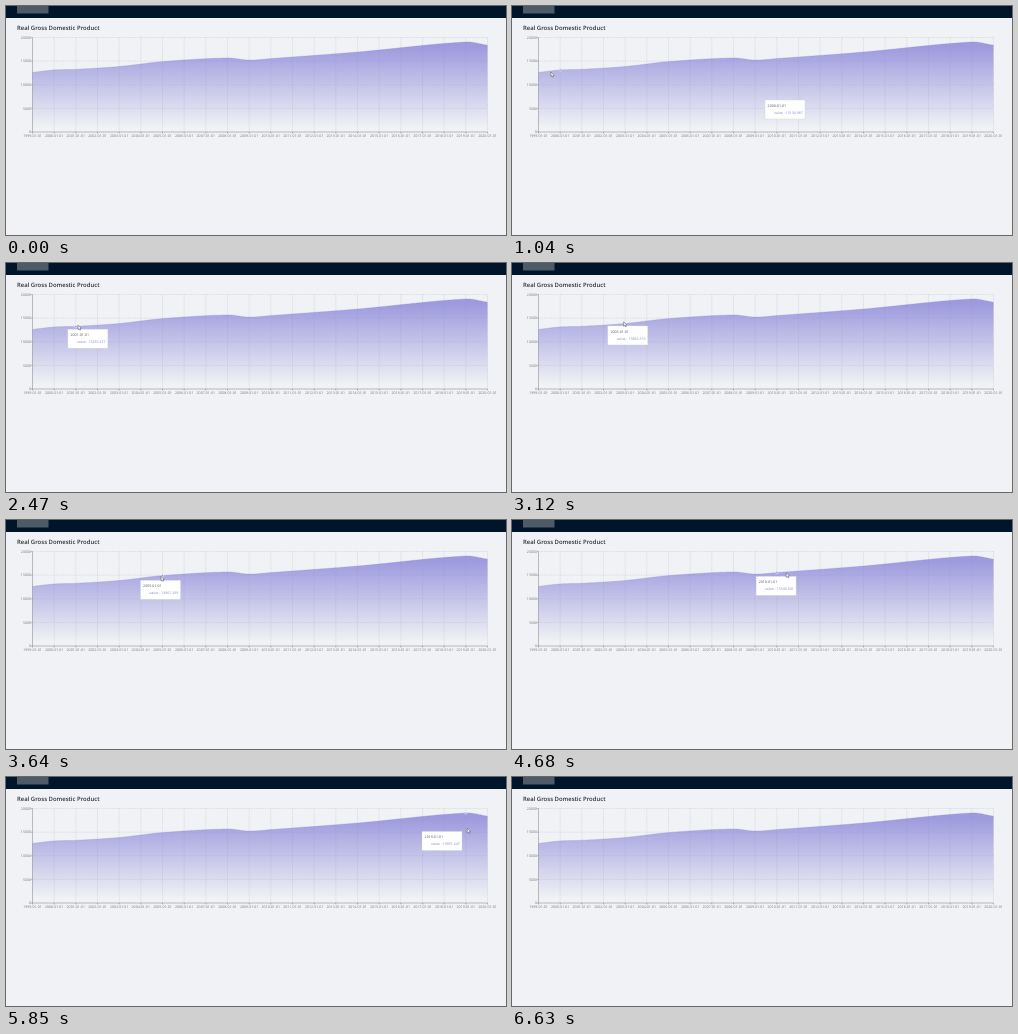
An HTML page with a canvas for the animation above (8.32 s loop, 500 by 229 pixels).

```html
<!DOCTYPE html>
<html lang="en">
<head>
<meta charset="utf-8">
<title>Real Gross Domestic Product</title>
<style>
  html, body { margin: 0; width: 100%; height: 100%; overflow: hidden; background: #f0f2f5; }
  canvas { display: block; }
</style>
</head>
<body>
<canvas id="stage" width="500" height="229"></canvas>
<script>
const ctx = document.getElementById('stage').getContext('2d');
const LOOP = 8320, STEP = 130;
const LEFT = 26.5, RIGHT = 481.5, TOP = 31.5, BOTTOM = 126;
const FIRST = 1999, LAST = 2020;
const ENTER = 780, HOVER = 1040, LEAVE = 5950, GONE = 6500;
const LAG = 230, SETTLE = 390;
const FONT = '"Open Sans", "Noto Sans", sans-serif';
const GRID = '#c3c5c9', AXIS = '#777', LILAC = '#8884d8';
const ARROW = new Path2D('M0 0V4.5L1 3.6 1.8 5.2 2.6 4.8 1.9 3.3H3.2Z');

// Turning points of the series; the years between are interpolated
const keys = [
  [1999, 12611.214], [2000, 13130.987], [2001, 13263.417], [2003, 13865.519],
  [2005, 14901.269], [2008, 15666.738], [2009, 15219.277], [2010, 15540.501],
  [2014, 16932.051], [2019, 19051.247], [2020, 18370.409]
];

const clamp = (v, lo, hi) => Math.max(lo, Math.min(hi, v));
const xOf = year => LEFT + (year - FIRST) / (LAST - FIRST) * (RIGHT - LEFT);
const yearOf = x => FIRST + (x - LEFT) / (RIGHT - LEFT) * (LAST - FIRST);
const yOf = value => BOTTOM - value / 20000 * (BOTTOM - TOP);

function slope(i) {
  const a = keys[Math.max(0, i - 1)], b = keys[Math.min(keys.length - 1, i + 1)];
  return (b[1] - a[1]) / (b[0] - a[0]);
}

function gdp(year) {
  const i = clamp(keys.findIndex(k => k[0] >= year), 1, keys.length - 1);
  const [x0, y0] = keys[i - 1], [x1, y1] = keys[i];
  const w = x1 - x0, u = (year - x0) / w, v = 1 - u;
  return y0 * v * v * (1 + 2 * u) + y1 * u * u * (3 - 2 * u)
    + w * u * v * (slope(i - 1) * v - slope(i) * u);
}

// Accelerating sweep along the curve
function sweep(t) {
  const x = 39 + 15.6 * Math.max(0, (t - HOVER) / 1000) ** 2.1;
  return { x, y: 51 + 15 * Math.exp((39 - x) / 110) };
}

function pointerAt(t) {
  const { x, y } = sweep(t);
  const before = Math.max(0, (HOVER - t) / (HOVER - ENTER));
  const after = Math.max(0, (t - LEAVE) / (GONE - LEAVE));
  return { x: Math.min(494, x + 290 * before), y: y + 124 * before + 130 * after };
}

function tooltipAt(t) {
  const { x, y } = sweep(t - LAG);
  const k = Math.max(0, 1 - (t - HOVER) / SETTLE) ** 2;
  return { x: clamp(x, 51, 416) + 202 * k, y: y + 3 + 25 * k };
}

function text(s, x, y, color, align = 'left', size = 3.55, weight = 400) {
  ctx.font = `${weight} ${size}px ${FONT}`;
  ctx.textAlign = align;
  ctx.fillStyle = color;
  ctx.fillText(s, x, y);
}

function line(x1, y1, x2, y2, color, width, dash = []) {
  ctx.setLineDash(dash);
  ctx.strokeStyle = color;
  ctx.lineWidth = width;
  ctx.beginPath();
  ctx.moveTo(x1, y1);
  ctx.lineTo(x2, y2);
  ctx.stroke();
  ctx.setLineDash([]);
}

function box(x, y, w, h, color) {
  ctx.fillStyle = color;
  ctx.fillRect(x, y, w, h);
}

function drawPage() {
  box(0, 0, 500, 229, '#f0f2f5');
  box(0, 0, 500, 12, '#001529');
  box(11, 0, 31.5, 7.5, '#4d5b69');
  text('Real Gross Domestic Product', 11, 24, '#2d3036', 'left', 5.95, 600);
}

function drawGrid() {
  for (let value = 0; value <= 20000; value += 5000) {
    const y = yOf(value);
    line(LEFT, y, RIGHT, y, GRID, 0.5, [1, 0.8]);
    line(LEFT - 1.5, y, LEFT, y, AXIS, 0.5);
    text(value, LEFT - 1.5, y + 1.3, AXIS, 'right');
  }
  for (let year = FIRST; year <= LAST; year++) {
    const x = xOf(year);
    line(x, TOP, x, BOTTOM, GRID, 0.5, [1, 0.8]);
    line(x, BOTTOM, x, BOTTOM + 1.5, AXIS, 0.5);
    text(year + '-01-01', x, 131, AXIS, 'center');
  }
}

function drawArea() {
  const fade = ctx.createLinearGradient(0, 36, 0, BOTTOM);
  fade.addColorStop(0.05, 'rgba(136,132,216,.8)');
  fade.addColorStop(0.95, 'rgba(136,132,216,0)');
  ctx.beginPath();
  for (let x = LEFT; x <= RIGHT; x++) ctx.lineTo(x, yOf(gdp(yearOf(x))));
  ctx.strokeStyle = LILAC;
  ctx.lineWidth = 0.3;
  ctx.stroke();
  ctx.lineTo(RIGHT, BOTTOM);
  ctx.lineTo(LEFT, BOTTOM);
  ctx.fillStyle = fade;
  ctx.fill();
  line(LEFT, TOP, LEFT, BOTTOM, AXIS, 0.4);
  line(LEFT, BOTTOM, RIGHT, BOTTOM, AXIS, 0.4);
}

function drawTooltip(year, { x, y }) {
  const value = gdp(year);
  ctx.beginPath();
  ctx.arc(xOf(year), yOf(value), 1.1, 0, Math.PI * 2);
  ctx.fillStyle = LILAC;
  ctx.fill();
  ctx.strokeStyle = '#fff';
  ctx.lineWidth = 0.6;
  ctx.stroke();

  box(x, y, 40, 19, '#fff');
  ctx.strokeStyle = '#d3d4d8';
  ctx.lineWidth = 0.4;
  ctx.strokeRect(x, y, 40, 19);
  text(year + '-01-01', x + 2.6, y + 7, '#555');
  text('value : ' + value.toFixed(3), x + 9, y + 13.8, LILAC);
}

function drawPointer({ x, y }) {
  ctx.save();
  ctx.translate(x, y);
  ctx.fillStyle = '#fff';
  ctx.fill(ARROW);
  ctx.strokeStyle = '#555';
  ctx.lineWidth = 0.5;
  ctx.stroke(ARROW);
  ctx.restore();
}

function frame(now) {
  const t = Math.floor(now % LOOP / STEP) * STEP;
  drawPage();
  drawGrid();
  drawArea();
  if (t >= ENTER && t <= GONE) {
    const pointer = pointerAt(t);
    const year = Math.round(yearOf(pointer.x));
    if (pointer.y < BOTTOM && year <= LAST) drawTooltip(year, tooltipAt(t));
    drawPointer(pointer);
  }
  requestAnimationFrame(frame);
}

ctx.textRendering = 'geometricPrecision';
requestAnimationFrame(frame);
</script>
</body>
</html>
```
